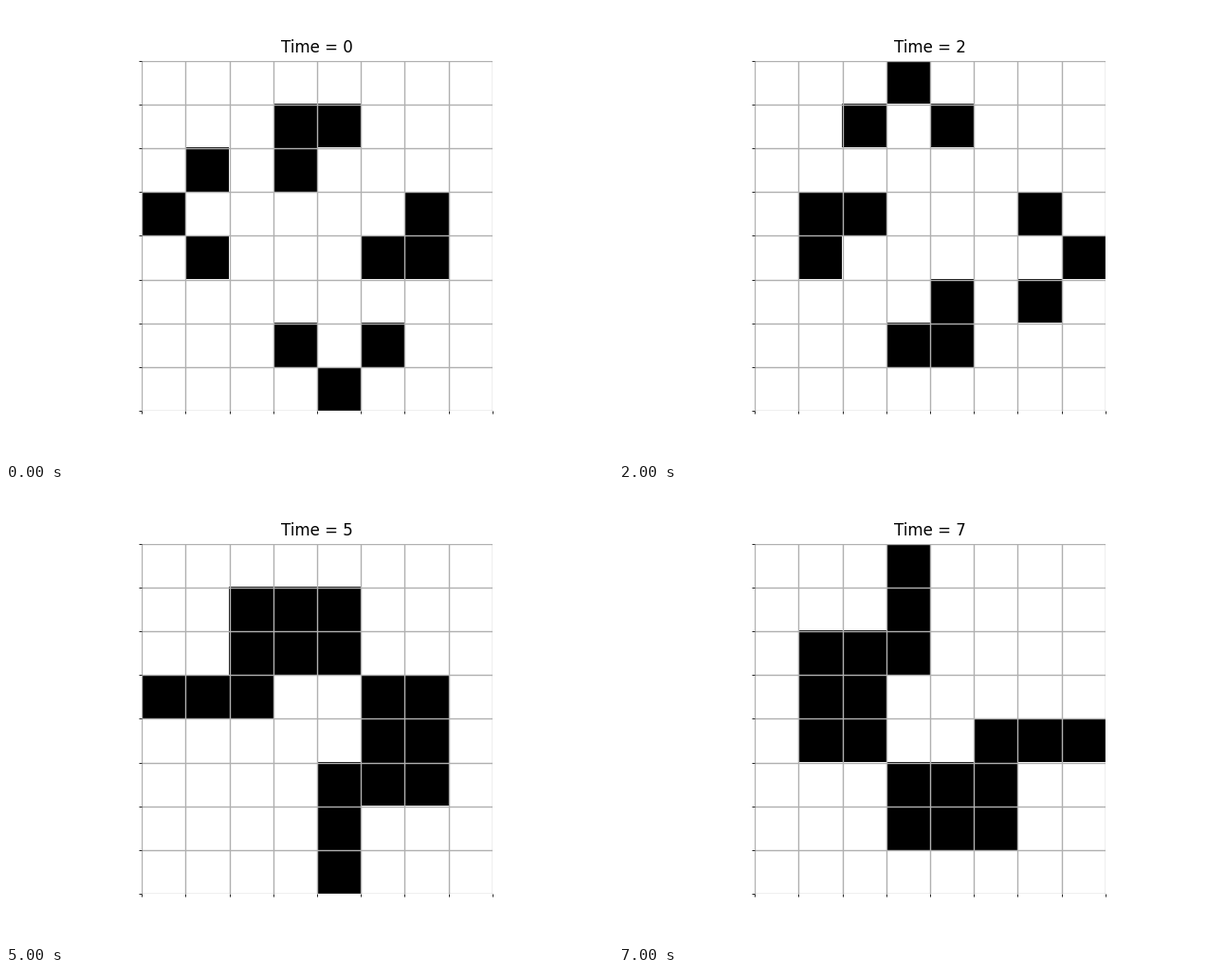
Animation of 640x480 px, one loop 8000 ms. Source, as a matplotlib script:

```python
import numpy as np
import matplotlib.pyplot as plt
from matplotlib.animation import FuncAnimation

SIZE = 8
STEPS = 8


def starting_grid():
    """A chevron and a corner, mirrored across the rising diagonal."""
    half = np.zeros((SIZE, SIZE), dtype=int)
    for d in (-1, 0, 1):
        half[3 + d, abs(d)] = 1
    half[1, 3:5] = half[2, 3] = 1
    return half | half[::-1, ::-1].T


def next_generation(grid):
    """Game of Life step; everything outside the board is dead."""
    padded = np.pad(grid, 1)
    block = sum(padded[r:r + SIZE, c:c + SIZE]
                for r in range(3) for c in range(3))
    return ((block == 3) | ((grid == 1) & (block == 4))).astype(int)


generations = [starting_grid()]
for _ in range(STEPS - 1):
    generations.append(next_generation(generations[-1]))

fig, ax = plt.subplots(figsize=(6.4, 4.8), dpi=100)
image = ax.imshow(generations[0], cmap="binary", vmin=0, vmax=1)
title = ax.set_title("Time = 0")

edges = np.arange(-0.5, SIZE)
ax.set_xticks([])
ax.set_yticks([])
ax.set_xticks(edges, minor=True)
ax.set_yticks(edges, minor=True)
ax.grid(which="minor", linewidth=1)
ax.spines[:].set_visible(False)


def update(step):
    image.set_data(generations[step])
    title.set_text(f"Time = {step}")
    return image, title


anim = FuncAnimation(fig, update, frames=STEPS, interval=1000,
                     repeat=True, repeat_delay=0, blit=False)
plt.show()
```
